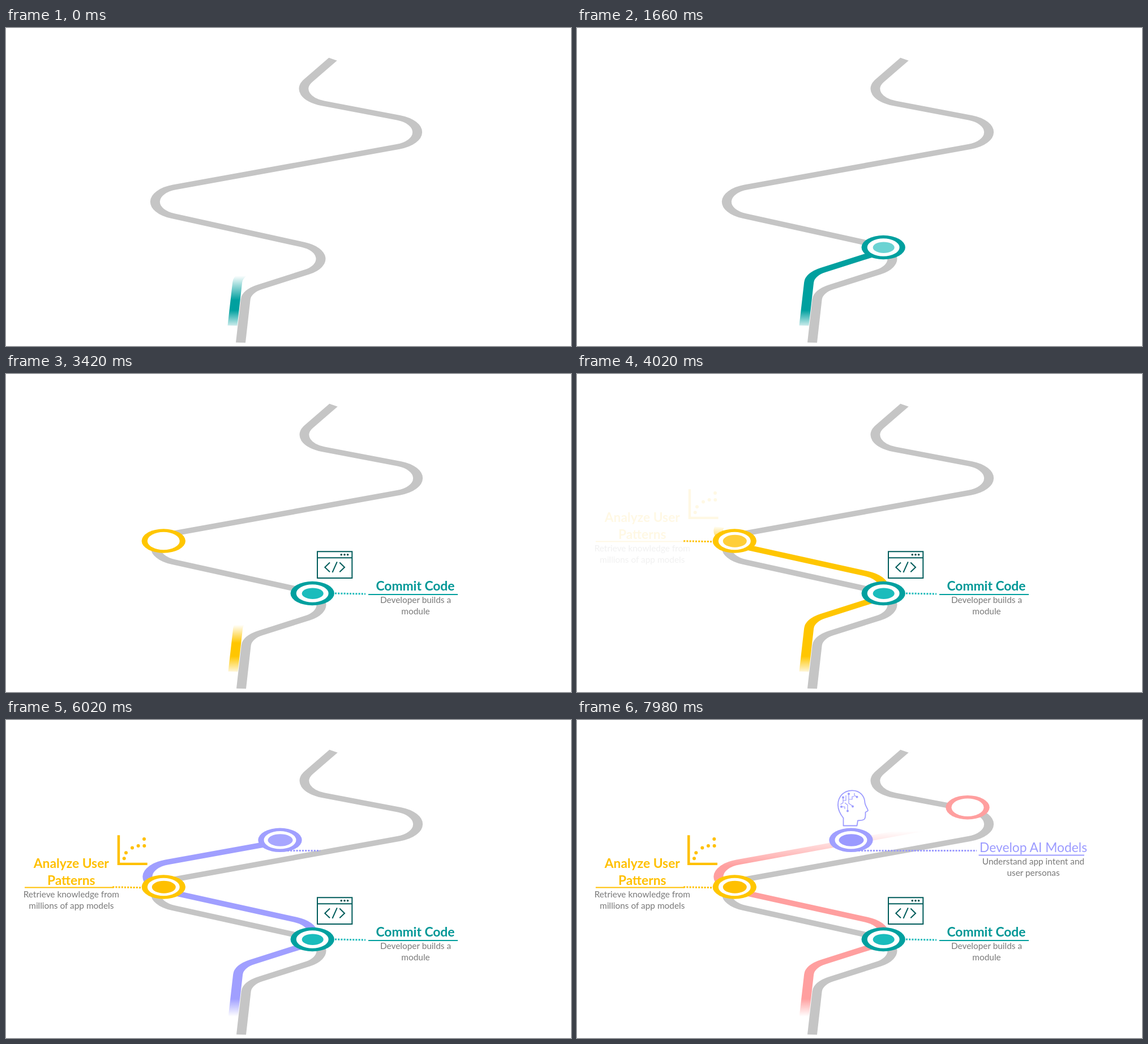
Recreate the animation shown at these times as an HTML page. Size 998x561 px, loop 8000 ms.

```html
<!DOCTYPE html>
<html lang="en">
<head>
<meta charset="utf-8">
<title>Road map</title>
<style>
  html, body { margin: 0; width: 100%; height: 100%; overflow: hidden; background: #fff; }
  svg { display: block; width: 998px; height: 561px; }
  text { font-family: Lato, "Open Sans", sans-serif; text-anchor: middle; }
  .title { font-size: 22.8px; }
  .bold { font-weight: 700; }
  .note { font-size: 15.4px; fill: #7a7a7a; }
  .line { fill: none; stroke-width: 2; }
</style>
</head>
<body>
<svg viewBox="0 0 998 561" xmlns="http://www.w3.org/2000/svg">
  <defs>
    <linearGradient id="wipe" gradientUnits="userSpaceOnUse" x1="0" x2="0">
      <stop offset="0" stop-color="#fff"/>
      <stop offset="1" stop-color="#fff" stop-opacity="0"/>
    </linearGradient>
    <mask id="reveal" maskUnits="userSpaceOnUse" x="0" y="0" width="998" height="561">
      <rect width="998" height="561" fill="url(#wipe)"/>
    </mask>
  </defs>
  <g id="ground">
    <path id="road" fill="none" stroke="#c5c5c5" stroke-width="17"/>
    <g id="lanes" mask="url(#reveal)"></g>
  </g>
  <g id="rings"></g>

  <g id="label0">
    <text class="title bold" x="723" y="381.5" fill="#009796">Commit Code</text>
    <path class="line" d="M640 389H798" stroke="#009f9e"/>
    <text class="note" x="723.5" y="403.5">Developer builds a</text>
    <text class="note" x="723.5" y="423.5">module</text>
    <g class="line" stroke="#005c5b">
      <path d="M550 313.3H611.3V360H550ZM550 324.2H611.3"/>
      <path d="M572 332.5L563.3 341L572 349.3M584.8 331.3L576.5 350M589.3 332.5L598 341L589.3 349.3"/>
    </g>
    <g fill="#004f4e">
      <circle cx="592.3" cy="318.7" r="1.8"/><circle cx="598" cy="318.7" r="1.8"/><circle cx="603.6" cy="318.7" r="1.8"/>
    </g>
  </g>

  <g id="label1">
    <text class="title bold" x="115.3" y="261.3" fill="#ffc000">Analyze User</text>
    <text class="title bold" x="115.3" y="291.3" fill="#ffc000">Patterns</text>
    <path class="line" d="M33 295.5H190" stroke="#ffc000"/>
    <text class="note" x="115.3" y="313">Retrieve knowledge from</text>
    <text class="note" x="115.3" y="333">millions of app models</text>
    <g id="chart" fill="#ffc000">
      <path d="M196.7 203.3H201.2V251.7H249.7V256H196.7Z"/>
    </g>
  </g>

  <g id="label2">
    <text class="title" x="806" y="233.3" fill="#9c9bff">Develop AI Models</text>
    <path class="line" d="M709.5 238.5H896" stroke="#9c9bff"/>
    <text class="note" x="806" y="255.3">Understand app intent and</text>
    <text class="note" x="806" y="275.3">user personas</text>
  </g>

  <g id="head" fill="none" stroke="#9c9bff" stroke-width="1.8" stroke-linejoin="round">
    <path d="M470.5 186.5V173C465 166 461 159 461 150C461 134 472 124.3 486 124.3C499 124.3 508 133 508.5 146
      C508.7 150 513 156 514 159.5C514 161.3 510 161.5 509.5 163C509.5 167 510 171 508 174.5C505 178 499 177 496 177.3L494.5 186.5Z"/>
    <path stroke-width="1.2" d="M470 137V146L465.5 149M470 142H475V133M480 130V147L487 152M480 140H486V135H490M478 160V150L473 146M467 153H473V157M490 129V133L495 136"/>
    <g id="nodes" fill="#9c9bff" stroke="none"></g>
  </g>
</svg>
<script>
const NS = "http://www.w3.org/2000/svg";
const $ = id => document.getElementById(id);
const K = 0.54;                    // vertical squash of the ground plane
const SHIFT = { x: -14.5, y: -30 }; // coloured lane relative to the road
const BASE = 525;

function add(parent, tag, attrs) {
  const el = parent.appendChild(document.createElementNS(NS, tag));
  for (const k in attrs) el.setAttribute(k, attrs[k]);
  return el;
}

// Polyline with round corners of radius r
function roundPath(pts, r) {
  const unit = (a, b) => {
    const x = b[0] - a[0], y = b[1] - a[1], l = Math.hypot(x, y);
    return [x / l, y / l];
  };
  let d = "M" + pts[0];
  for (let i = 1; i < pts.length - 1; i++) {
    const p = pts[i], u = unit(p, pts[i - 1]), v = unit(p, pts[i + 1]);
    const half = Math.acos(u[0] * v[0] + u[1] * v[1]) / 2;
    const t = r / Math.tan(half);
    const sweep = u[1] * v[0] - u[0] * v[1] > 0 ? 1 : 0;
    d += `L${p[0] + u[0] * t},${p[1] + u[1] * t}A${r},${r} 0 0 ${sweep} ${p[0] + v[0] * t},${p[1] + v[1] * t}`;
  }
  return d + "L" + pts[pts.length - 1];
}

const course = [[415.5, 555], [425.8, 464.4], [619.4, 402.8], [170.7, 304.1],
  [831.1, 184.4], [501.5, 121.5], [578.5, 55]].map(([x, y]) => [x, y / K]);
const road = $("road"), shape = roundPath(course, 50);
road.setAttribute("d", shape);
road.setAttribute("transform", `scale(1 ${K})`);

// wipe, fill, dots, text: [start, end]; ring and out: fades of the ring and the lane
const stops = [
  { x: 541.2, y: 387, end: [541, 387], color: "#00a09f", inner: "#1bbcbc", rx: 19, ry: 9.7,
    fade: [498, 532], top: 329, soft: 43, dots: [581, 387, 635, 388],
    ring: [760, 1020], wipe: [1160, 1500], fill: [1480, 1760], dash: [1760, 2180], text: [2140, 2580], out: [2700, 2820] },
  { x: 278.3, y: 294.5, end: [251, 270], color: "#ffc600", inner: "#ffc000", rx: 21, ry: 11,
    fade: [498, 530], top: 268, soft: 32, dots: [238, 295.7, 186, 294.7],
    ring: [2880, 3140], wipe: [3270, 3740], fill: [3740, 4100], dash: [3760, 3990], text: [3970, 4470], out: [4500, 4620] },
  { x: 484, y: 211.8, end: [484, 212], color: "#a09fff", inner: "#9a99ff", rx: 22, ry: 10.7,
    fade: [492, 523], top: 150, soft: 55, dots: [497, 230.5, 706, 230.5],
    ring: [4680, 4940], wipe: [5125, 5690], fill: [5640, 6080], dash: [5860, 6440], text: [6380, 6780], out: [6860, 6980] },
  { x: 690, y: 154.2, end: [700, 154], color: "#ff9f9f",
    fade: [492, 523], top: 78, soft: 62,
    ring: [7040, 7300], wipe: [7480, 8160], out: [9000, 9100] }
];

const total = road.getTotalLength();
function lengthNear([x, y]) {
  let best = 0, min = Infinity;
  for (let l = 0; l < total; l += 2) {
    const p = road.getPointAtLength(l);
    const dist = Math.hypot(p.x + SHIFT.x - x, p.y * K + SHIFT.y - y);
    if (dist < min) { min = dist; best = l; }
  }
  return best;
}

stops.forEach((s, i) => {
  const local = y => (y - SHIFT.y) / K;
  const grad = add(document.querySelector("defs"), "linearGradient", {
    id: "tone" + i, gradientUnits: "userSpaceOnUse", x1: 0, x2: 0, y1: local(s.fade[0]), y2: local(s.fade[1])
  });
  add(grad, "stop", { offset: 0, "stop-color": s.color });
  add(grad, "stop", { offset: 1, "stop-color": s.color, "stop-opacity": 0 });
  s.lane = add($("lanes"), "path", {
    d: shape, fill: "none", stroke: `url(#tone${i})`, "stroke-width": 17,
    "stroke-dasharray": `${lengthNear(s.end)} 9999`,
    transform: `translate(${SHIFT.x} ${SHIFT.y}) scale(1 ${K})`
  });
  s.group = add($("rings"), "g", {});
  add(s.group, "ellipse", { cx: s.x, cy: s.y, rx: 38.7, ry: 21.2, fill: s.color });
  add(s.group, "ellipse", { cx: s.x, cy: s.y, rx: 28.5, ry: 15.7, fill: "#fff" });
  if (!s.inner) return;
  s.core = add(s.group, "ellipse", { cx: s.x + 0.5, cy: s.y + 0.2, rx: s.rx, ry: s.ry, fill: s.inner });
  s.trail = add($("rings"), "line", {
    x1: s.dots[0], y1: s.dots[1], stroke: s.inner, "stroke-width": 3, "stroke-dasharray": "3 2.2"
  });
  s.label = $("label" + i);
});

function scatter(parent, r, pts) {
  for (const [cx, cy] of pts) add(parent, "circle", { cx, cy, r });
}
scatter($("chart"), 3, [[208.7, 244.3], [212, 234.3], [223, 225.5], [233.6, 222], [244.3, 222], [244, 210]]);
scatter($("nodes"), 2, [[470, 136.5], [480, 130.3], [487, 152.5], [478, 160.5], [467, 153], [494.5, 135.7]]);

const part = (t, [a, b]) => Math.min(1, Math.max(0, (t - a) / (b - a)));
const smooth = p => p * p * (3 - 2 * p);
const show = (el, v) => el.setAttribute("opacity", v);

function setWipe(front, soft) {
  $("wipe").setAttribute("y1", front + soft);
  $("wipe").setAttribute("y2", front);
}

function draw(t) {
  const opening = t < 700;
  if (opening) setWipe(437, 43);
  $("ground").setAttribute("transform", `translate(${smooth(part(t, [580, 1020])) - 1} 0)`);

  stops.forEach((s, i) => {
    const p = part(t, s.wipe);
    const active = p > 0 && t < s.out[1];
    if (active) setWipe(BASE + (s.top - BASE) * p, s.soft);
    show(s.lane, active ? 1 - part(t, s.out) : i === 0 && opening ? 1 - part(t, [580, 700]) : 0);
    show(s.group, part(t, s.ring));
    if (!s.core) return;
    show(s.core, part(t, s.fill));
    const d = part(t, s.dash), [x1, y1, x2, y2] = s.dots;
    s.trail.setAttribute("x2", x1 + (x2 - x1) * d);
    s.trail.setAttribute("y2", y1 + (y2 - y1) * d);
    show(s.trail, d > 0 ? 1 : 0);
    show(s.label, part(t, s.text));
  });

  show($("head"), part(t, [7040, 7300]));
  $("chart").setAttribute("transform", `translate(${-1.7 * smooth(part(t, [6860, 7300]))} 0)`);
}

const start = performance.now();
function tick() {
  draw((performance.now() - start) % 8000);
  requestAnimationFrame(tick);
}
tick();
</script>
</body>
</html>
```
